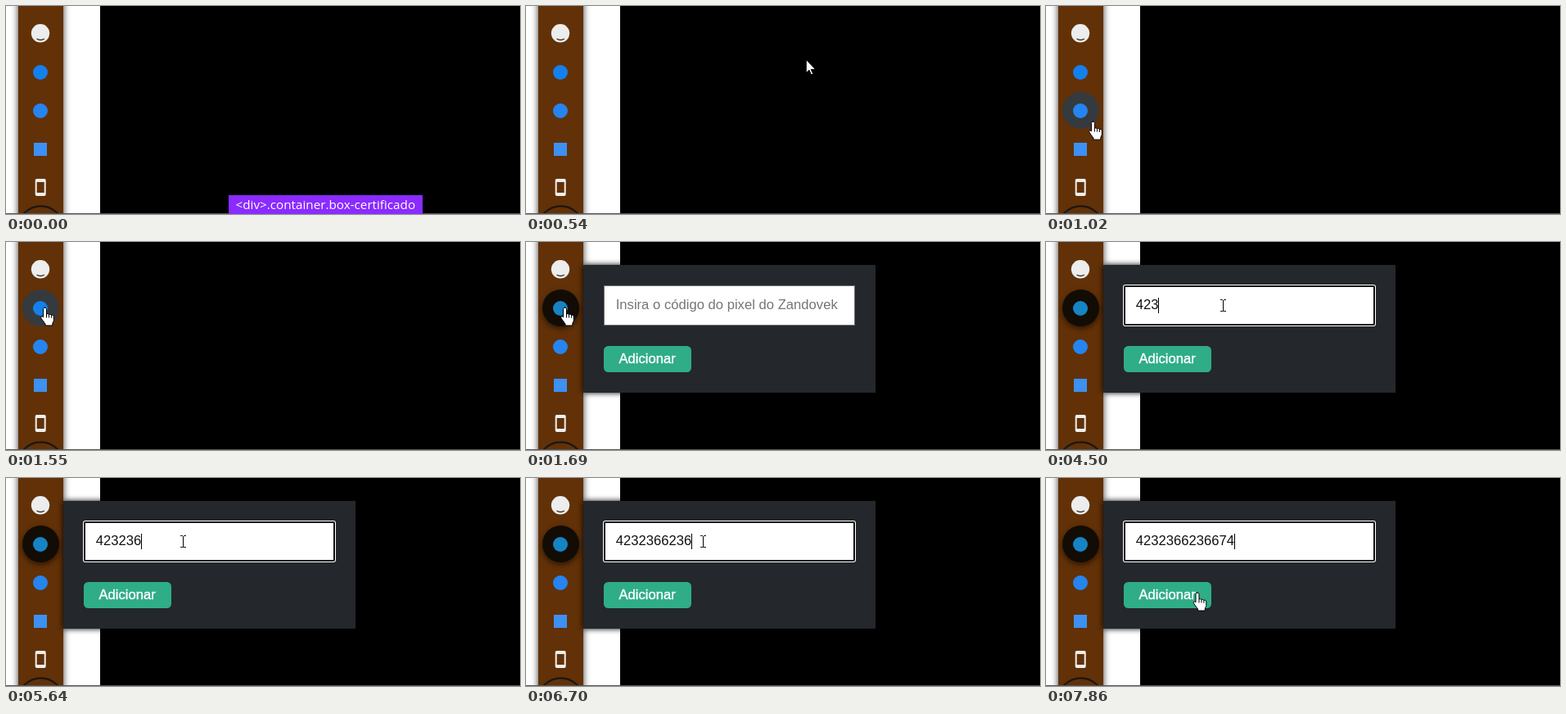
Animation, 628 px wide and 254 px high, one loop 7.99 s. Source, as an HTML page:

```html
<!DOCTYPE html>
<html lang="pt">
<head>
<meta charset="utf-8">
<title>Pixel</title>
<style>
  html, body { margin: 0; width: 100%; height: 100%; overflow: hidden; background: #fff; }
  svg { display: block; }
  text { font: 16.65px "Liberation Sans", Arial, sans-serif; }
  #tip text { font: 15.24px "Open Sans", sans-serif; }
  #bar { filter: drop-shadow(0 0 4px #000c); }
  #active { filter: drop-shadow(0 3px 3px #0008); }
  #panel > .box { filter: drop-shadow(0 0 3.5px #000); }
  #cursors path { stroke-linejoin: round; stroke-linecap: round; }
</style>
</head>
<body>
<svg width="628" height="254" viewBox="0 0 628 254">
  <rect id="bar" x="15" y="-20" width="55" height="300" fill="#623107"/>
  <rect x="115" width="513" height="253"/>

  <circle id="hover" cx="42.5" r="22.5" fill="#353a3e"/>
  <circle id="active" cx="42.5" cy="80.5" r="22.5" fill="#120c05"/>

  <circle cx="42" cy="33.3" r="11.2" fill="#ededed"/>
  <path d="M37.5 40q4.7 3 9.4 0" fill="none" stroke="#3a2a1c" stroke-width="1.3"/>
  <circle id="blue" cx="42" cy="81" r="9"/>
  <circle cx="42" cy="128" r="9" fill="#2684f0"/>
  <rect x="34" y="167" width="16" height="16" fill="#3c91f3"/>
  <rect x="35.7" y="211" width="13" height="21" rx="2" fill="#f0efee"/>
  <rect x="37.7" y="215" width="9" height="13" fill="#623107"/>
  <circle cx="42.5" cy="272" r="27.7" fill="none" stroke="#1a1715" stroke-width="2.3"/>
  <rect y="253" width="628" height="1" fill="#555"/>

  <g id="tip">
    <rect x="272" y="231" width="237" height="23" fill="#8a2bff"/>
    <text x="280.5" y="248" fill="#fff">&lt;div&gt;.container.box-certificado</text>
  </g>

  <g id="panel">
    <rect class="box" x="70" y="28" width="357" height="156" fill="#24272c"/>
    <rect x="95.5" y="53.5" width="306" height="48" fill="#fff" stroke="#767676"/>
    <g id="focus">
      <rect x="94" y="52" width="309" height="51" rx="3" fill="#fff"/>
      <rect x="96" y="54" width="305" height="47" rx="1" fill="#fff" stroke="#101010" stroke-width="2"/>
    </g>
    <text id="value" x="109.7" y="82"/>
    <rect id="caret" y="68" width="1" height="19"/>
    <rect x="95" y="127" width="107" height="32" rx="5.5" fill="#2fad87"/>
    <text x="113.5" y="148" fill="#fff" stroke="#fff" stroke-width=".35">Adicionar</text>
  </g>

  <g id="cursors" fill="#fff" stroke="#000">
    <path id="arrow" d="M.5.5v16l3.7-3.5 2.5 5.7 2.3-1-2.5-5.5h5.2z"/>
    <path id="beam" fill="none" d="M-3-7h2l1 1 1-1h2M0-6v13M-3 7h2l1-1 1 1h2"/>
    <path id="hand" d="M0 .5c1.2 0 2 .8 2 2v6c.5-.5 2.6-.4 3 .6.6-.6 2.6-.4 2.9.8.8-.5 2.9-.2 2.9 1.700v4.400c0 1.500-1.500 3-1.500 4.500v2h-8.800v-2C-.5 19-4.700 14-4.700 12.800c-.2-1.600 1.600-2 2.700-.6V2.500c0-1.200.8-2 2-2zM2 8.500v4M5 9.100v3.500M7.900 9.900v3"/>
  </g>
</svg>
<script>
const LOOP = 7990, OPEN = 1690, FOCUS = 2360, BLINK = 530;
const digits = "4232366236674";
const typedAt = [4080, 4370, 4500, 5100, 5300, 5640, 5840, 6100, 6230, 6700, 6970, 7170, 7460];
const hint = "Insira o código do pixel do Zandovek";

// Pointer stops: time, x, y
const stops = [
  [260, 628, 0], [480, 400, 50], [700, 190, 105], [880, 85, 135], [1020, 57.5, 141],
  [1220, 47.5, 79.5], [1960, 47.5, 79.5], [2160, 216.5, 77.5],
  [7200, 216.5, 77.5], [7580, 188, 136], [7720, 188, 136], [7860, 185, 139.5]
];

const $ = id => document.getElementById(id);
const show = (id, on) => $(id).style.display = on ? "" : "none";
const inside = ([x, y], l, t, r, b) => x >= l && x <= r && y >= t && y <= b;

function pointer(t) {
  const i = stops.findIndex(s => s[0] > t);
  if (i < 0) return stops[stops.length - 1].slice(1);
  const a = stops[Math.max(i - 1, 0)], b = stops[i];
  const k = Math.max(0, (t - a[0]) / (b[0] - a[0]));
  return [1, 2].map(j => a[j] + (b[j] - a[j]) * k);
}

function draw(t) {
  const pos = pointer(t), open = t >= OPEN, focused = t >= FOCUS;
  const hovered = [80.5, 127.5, 174.5, 221.5].find(y => Math.hypot(pos[0] - 42.5, pos[1] - y) < 22.5);

  show("tip", t < 260);
  show("panel", open);
  show("active", open);
  show("focus", focused);
  show("hover", t >= 260 && hovered);
  $("hover").setAttribute("cy", hovered || 0);
  $("blue").setAttribute("fill", open ? "#1683c4" : "#1480ee");

  const count = typedAt.filter(at => at <= t).length;
  const value = $("value");
  value.textContent = count ? digits.slice(0, count) : hint;
  value.setAttribute("fill", count ? "#111" : "#757575");
  const since = t - (count ? typedAt[count - 1] : FOCUS);
  show("caret", focused && Math.floor(since / BLINK) % 2 === 0);
  const width = count && open ? value.getComputedTextLength() : 0;
  $("caret").setAttribute("x", Math.round(109.7 + width));

  let shape = "arrow";
  if (hovered || open && inside(pos, 95, 127, 202, 159)) shape = "hand";
  else if (open && inside(pos, 95, 53, 402, 102)) shape = "beam";
  for (const id of ["arrow", "beam", "hand"]) show(id, t >= 260 && id === shape);
  $("cursors").setAttribute("transform", `translate(${pos})`);
}

const start = performance.now();
function tick() {
  draw((performance.now() - start) % LOOP);
  requestAnimationFrame(tick);
}
tick();
</script>
</body>
</html>
```
